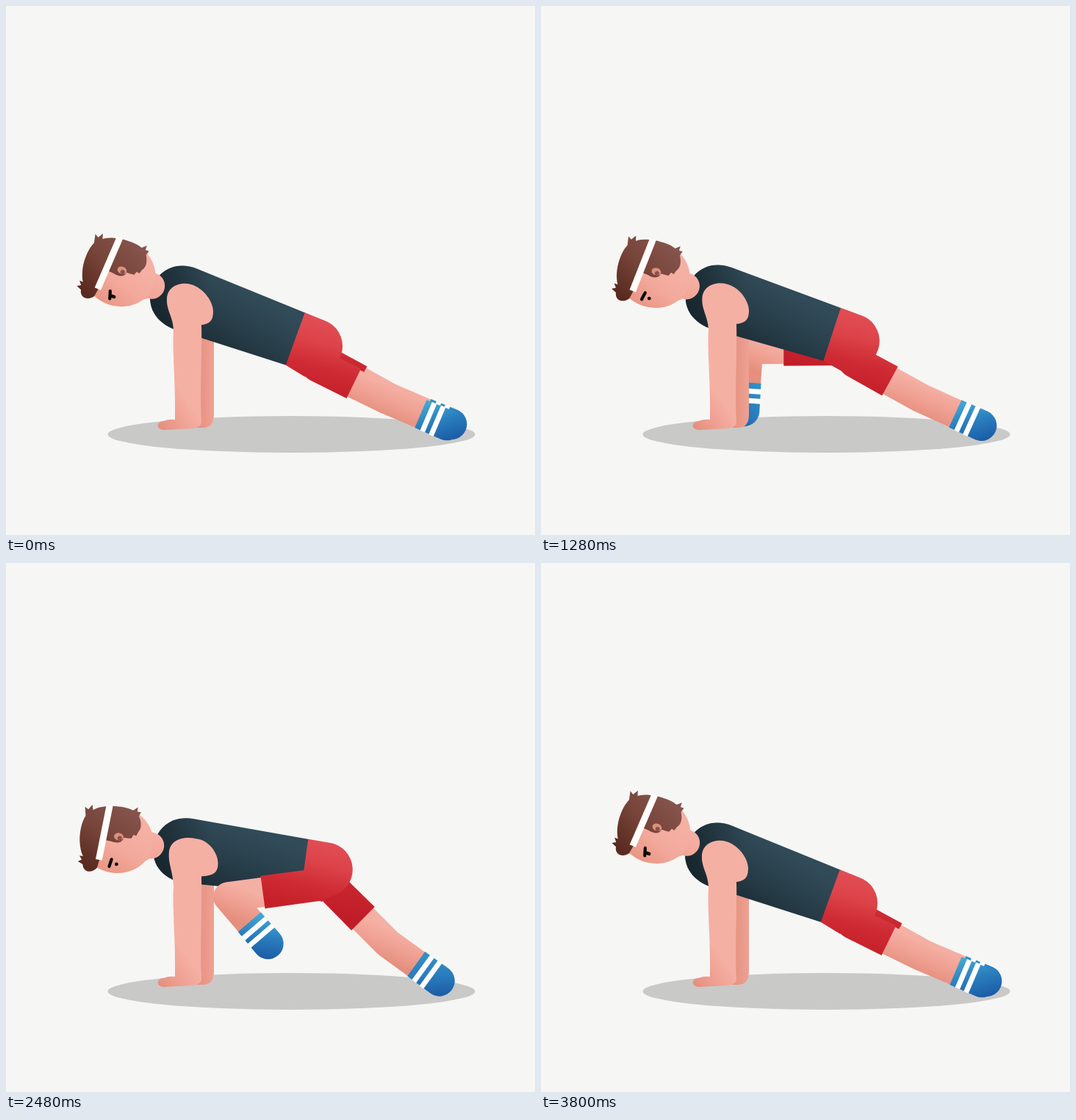
Animation, 720 px wide and 720 px high, one loop 3840 ms. Source, as an HTML page with a canvas:

```html
<!DOCTYPE html>
<html lang="en">
<head>
<meta charset="utf-8">
<title>Mountain climber</title>
<style>
  html, body { margin: 0; width: 100%; height: 100%; overflow: hidden; background: #f6f6f4; }
  canvas { display: block; width: 720px; height: 720px; }
</style>
</head>
<body>
<canvas id="stage" width="720" height="720"></canvas>
<script>
const ctx = document.getElementById('stage').getContext('2d');
const RAD = Math.PI / 180;
const STEP = 40, STEPS = 96;
const PINK = '#f5b0a4', ROSE = '#efa092', SHADE = '#e58f7e';
const WHITE = '#fdfdfc', INK = '#0c0808';

// Keys are [step, value]; values ease in and out between them.
const RISE = [[0, 0], [4, 0], [16, 1], [27, 0], [29.5, 0], [39.5, 1], [50, 0],
              [60, 1], [72, 0], [75, 0], [85, 1], [95, 0]];
const SWING = [[52, 0], [63, 1], [79, 1], [91, 0]];
const FOLD = [[52, 0], [57, -25], [60, -24], [62, 17], [66, 69], [79, 69], [85, -22], [92, 0]];
const BLINK = [[0, 1], [3, 0], [92, 0], [95, 1]];
const FAR_LEAD = 44;

function track(keys, t) {
  if (t <= keys[0][0]) return keys[0][1];
  for (let i = 1; i < keys.length; i++) {
    const [t0, v0] = keys[i - 1], [t1, v1] = keys[i];
    if (t < t1) return v0 + (v1 - v0) * (1 - Math.cos(Math.PI * (t - t0) / (t1 - t0))) / 2;
  }
  return keys[keys.length - 1][1];
}

const mix = (a, b, k) => a + (b - a) * k;
const polar = (p, deg, r) => ({ x: p.x + r * Math.cos(deg * RAD), y: p.y + r * Math.sin(deg * RAD) });

function gradient(x0, y0, x1, y1, ...stops) {
  const g = ctx.createLinearGradient(x0, y0, x1, y1);
  stops.forEach((c, i) => g.addColorStop(i / (stops.length - 1), c));
  return g;
}

function fill(d, style) {
  ctx.fillStyle = style;
  ctx.fill(new Path2D(d));
}

function stroke(d, style, width) {
  ctx.strokeStyle = style;
  ctx.lineWidth = width;
  ctx.stroke(new Path2D(d));
}

function ellipse(x, y, rx, ry, style) {
  ctx.fillStyle = style;
  ctx.beginPath();
  ctx.ellipse(x, y, rx, ry, 0, 0, 7);
  ctx.fill();
}

function at(p, deg, draw) {
  ctx.save();
  ctx.translate(p.x, p.y);
  ctx.rotate(deg * RAD);
  draw();
  ctx.restore();
}

// Maps a point of a rotated frame to the stage.
const place = (p, deg, x, y) => polar(polar(p, deg, x), deg + 90, y);
const onBody = (body, x, y) => place(body, body.angle, x, y);

function shortsPaint(body, far) {
  const hip = onBody(body, 192, 1);
  return far
    ? gradient(hip.x + 20, hip.y - 20, hip.x, hip.y + 55, '#d53a42', '#c9252e', '#c01d29')
    : gradient(hip.x + 12, hip.y - 38, hip.x - 12, hip.y + 58, '#e14e54', '#dc4349', '#cf2b34', '#c52029');
}

function sock(far) {
  fill('M-39-20.5 0-21A21 21 0 0 1 0 21L-39 20.5Z',
    gradient(-30, -22, 6, 22, far ? '#3190c6' : '#41a6d3', '#2a7dbd', '#1b5ca6'));
  fill('M-31-21h7v42h-7zM-18-21.5h7v43h-7z', WHITE);
}

function leg(body, t, far) {
  const b = body.rise;
  const swing = track(SWING, t), fold = track(FOLD, t);
  const hip = onBody(body, 185, 23);
  if (far) {
    hip.x += mix(9, -4, swing);
    hip.y -= 7;
  }
  const thigh = mix(far ? 29 + 17 * b : 26 + 19 * b, far ? 180 : 175, swing);
  const shin = 23 + (far ? 14 : 10) * b + fold;
  const hem = polar(hip, thigh, 70);
  // A tight bend pushes the knee out.
  const knee = polar(hip, thigh, 123 + Math.max(0, -fold) / 4);
  const foot = polar(knee, shin, 84 + (1 - swing) * (7 - 5 * b));
  const ankle = polar(foot, shin, -37);

  stroke(`M${hem.x} ${hem.y}L${knee.x} ${knee.y} ${ankle.x} ${ankle.y}`,
    gradient(knee.x + 8, knee.y - 19, knee.x - 9, knee.y + 23, PINK, ROSE, SHADE), 40);
  at(foot, shin, () => sock(far));

  const start = 20 * (1 - swing);
  const pt = (x, y) => { const q = place(hip, thigh, x, y); return `${q.x} ${q.y}`; };
  fill(`M${pt(75, -22.5)}L${pt(75, 22.5)}L${pt(start, 22)}A22 22 0 0 1 ${pt(start, -22)}Z`,
    shortsPaint(body, far));
}

function pelvis(body) {
  const pt = (x, y) => { const q = onBody(body, x, y); return `${q.x} ${q.y}`; };
  fill(`M${pt(164, -37)}L${pt(192, -36)}A37 37 0 0 1 ${pt(205, 36)}L${pt(194, 45)}L${pt(164, 39)}Z`,
    shortsPaint(body));
}

function torso() {
  fill('M165-37 6-43C-26-44-43-22-43 2C-43 28-22 46 8 45L165 39Z',
    gradient(55, -44, 38, 46, '#314b58', '#2c4450', '#253a45', '#1d2e37'));
  fill('M-43 2C-43 28-22 46 8 45L40 43V-41L6-43C-26-44-43-22-43 2Z',
    gradient(-42, 14, 36, -6, 'rgba(22,36,43,.8)', 'rgba(22,36,43,0)'));
}

function farArm() {
  fill('M240 420H283V556Q283 574 268 574H240Z', gradient(262, 0, 284, 0, '#e6917f', '#eea294'));
}

function nearArm(b) {
  const l = 3 * b, u = -4 * b, r = 7 * b, v = -8 * b;
  fill(`M230 563C231 510 226 470 228 440C227 ${422 + u} ${218 + l} ${414 + u} ${219 + l} ${398 + u}
    C${220 + l} ${381 + u} ${238 + l} ${375 + u} ${252 + r} ${379 + u}
    C${269 + r} ${384 + v} ${282 + r} ${402 + v} ${282 + r} ${416 + v}
    C${282 + r} ${429 + v} ${276 + r} ${433 + v} 266 ${434 + v}
    C267 470 264 520 266 566Q266 574 254 575L216 577C204 577 204 566 214 565Q222 562 230 563Z`,
    gradient(206, 570, 250, 540, SHADE, ROSE, PINK));
}

function head(blink) {
  fill('M22-22 47-17A18 18 0 0 1 48 19L26 37Z', gradient(30, -18, 25, 36, PINK, ROSE));
  ellipse(0, 0, 50, 45, gradient(18, -25, -6, 46, PINK, '#f3aa9d', '#e99685'));

  const hair = gradient(14, -44, -28, 44, '#85544c', '#774439', '#592a1f');
  // front hair with its two tufts
  fill(`M-14-44C-26-43-33-39-37-36L-39-43-43.5-36-48.5-39-46-27C-53-12-51 14-42 28
    L-47 28-43 33-48 36-41 39C-39 50-27 50-21 41L-19 29Z`, hair);
  // hair behind the band
  fill(`M-12-45C0-46 9-46 17-43L23-48 23-42 28-42 26-36C31-28 32-20 28-15L26-9 22-10 20-5
    C15-4 11-5 9-4C9 2 2 5-6 3L-18 2Z`, hair);
  ellipse(2.5, -5, 6.5, 5, '#d9927f');
  ellipse(4, -3, 3, 3, '#8a5248');

  ctx.lineCap = 'butt';
  stroke('M-15.5-45.5L-20 30', WHITE, 9);
  ctx.lineCap = 'round';
  stroke(`M-3 27L${mix(-4.8, 0, blink)} 37`, INK, 4.2);
  stroke(`M${4.5 - 4.5 * blink} 32.7L4.7 32.6`, INK, 4.6);
}

function draw(now) {
  const t = Math.floor((now / STEP) % STEPS);
  const rise = track(RISE, t);
  const body = { x: 240 + 4 * rise, y: 396 - 6.5 * rise, angle: 20 - 13 * rise, rise };

  ctx.fillStyle = '#f6f6f4';
  ctx.fillRect(0, 0, 720, 720);
  ellipse(388.5, 583, 250, 25, '#c9c9c8');
  ctx.lineJoin = 'round';
  ctx.lineCap = 'butt';
  leg(body, t + FAR_LEAD, true);
  farArm();
  at(body, body.angle, torso);
  pelvis(body);
  at(onBody(body, -92 - 2.5 * rise, -1 + rise), body.angle, () => head(track(BLINK, t)));
  ctx.lineCap = 'butt';
  nearArm(rise);
  leg(body, t, false);
}

function frame() {
  draw(performance.now());
  requestAnimationFrame(frame);
}
frame();
</script>
</body>
</html>
```
